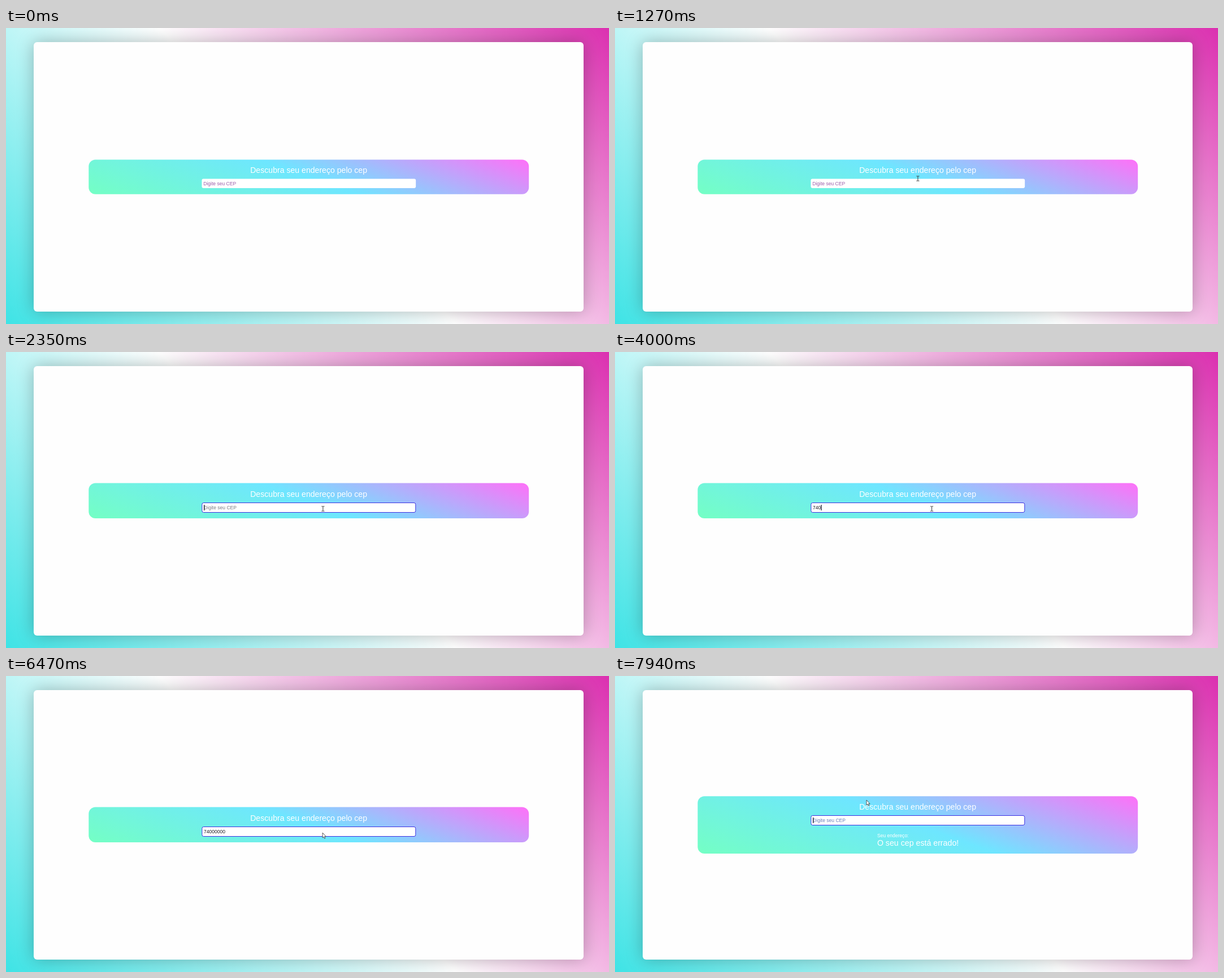
Write an HTML page that moves like this. It is 1067 px wide and 525 px high and loops after 8000 ms.

```html
<!DOCTYPE html>
<html lang="pt-BR">
<head>
<meta charset="utf-8">
<title>Descubra seu endereço pelo cep</title>
<style>
  html, body { margin: 0; width: 100%; height: 100%; overflow: hidden; }
  body { position: relative; background: linear-gradient(45deg, #3ee3e5, #fff 50%, #db30b0); }
  .card, svg { position: absolute; }
  .card {
    left: 49px; top: 25px; width: 973px; height: 478px;
    border-radius: 6px; background: #fefefe; box-shadow: 0 0 30px rgba(0, 0, 0, .27);
  }
  svg { left: 0; top: 0; }
  text { font: 8.54px "Liberation Sans", Arial, sans-serif; fill: #fff; white-space: pre; }
  .title { font-size: 14.1px; }
  .error { font-size: 14.2px; }
</style>
</head>
<body>
<div class="card"></div>
<svg width="1067" height="525" viewBox="0 0 1067 525">
  <linearGradient id="shade" gradientUnits="userSpaceOnUse">
    <stop stop-color="#74ffc4"/>
    <stop offset=".5" stop-color="#6ee6ff"/>
    <stop offset="1" stop-color="#ff70f8"/>
  </linearGradient>
  <rect id="panel" rx="12" fill="url(#shade)"/>
  <g id="form">
    <text class="title" x="432.2" y="257">Descubra seu endereço pelo cep</text>
    <rect id="box" fill="#fff" rx="2.8"/>
    <text id="value" y="279"></text>
    <rect id="caret" y="271" width="1.2" height="10" fill="#0c0c20"/>
  </g>
  <g id="answer">
    <text x="464" y="286.3">Seu endereço:</text>
    <text class="error" x="463.9" y="301">O seu cep está errado!</text>
  </g>
  <g id="pointer">
    <path id="arrow" d="M0 0V9L2 7.2 3.4 10.3 4.8 9.7 3.5 6.6H6.1Z" fill="#fff" stroke="#333" stroke-width=".8"/>
    <path id="beam" d="M-2.5-4.2H-.6L0-3.7.6-4.2H2.5M0-3.7V3.7M-2.5 4.2H-.6L0 3.7.6 4.2H2.5" fill="none" stroke="#333"/>
  </g>
</svg>
<script>
const LOOP = 8000, START = 70, STEP = 66.6;
const FOCUS = 2080, LEAVE = 6470, SUBMIT = 6550;
const CODE = '74000000', DIGIT = 4.75, BLINK = 530;
const KEY_START = 3470, KEY_GAP = 265, HOLD_START = 4530, REPEAT = 37;
const LEFT = 146.3, WIDTH = 778.9, TILT = 20 * Math.PI / 180, RISE = 20;

// Pointer stops: time, x, y
const stops = [
  [70, 1050, 494], [560, 235, 88], [950, 545, 18], [1100, 606, 288], [1268, 536.5, 267],
  [1480, 390, 262], [1800, 561, 278], [7200, 560, 278], [7560, 349, 262], [7740, 385, 195], [7920, 445, 220]
];

const el = id => document.getElementById(id);
const show = (id, on) => { el(id).style.display = on ? '' : 'none'; };
const set = (id, attrs) => {
  for (const k in attrs) el(id).setAttribute(k, attrs[k]);
};
const inside = (x, y, l, t, r, b) => x >= l && x <= r && y >= t && y <= b;

// Single presses first, then the zero key repeats while held.
function digitsAt(t) {
  if (t < KEY_START || t >= SUBMIT) return 0;
  if (t < HOLD_START) return Math.min(3, 1 + Math.floor((t - KEY_START) / KEY_GAP));
  return Math.min(CODE.length, 4 + Math.floor((t - HOLD_START) / REPEAT));
}

// Each key press restarts the blink.
function caretOn(t) {
  if (t < FOCUS) return false;
  const lastKey = HOLD_START + REPEAT * 4;
  if (t >= KEY_START && t < lastKey) return true;
  const since = t < KEY_START ? FOCUS : lastKey;
  return Math.floor((t - since) / BLINK) % 2 === 0;
}

function pointerAt(t) {
  const q = START + Math.floor((t - START) / STEP) * STEP;
  const i = stops.findIndex(s => s[0] > q);
  if (i < 0) return stops[stops.length - 1].slice(1);
  const [t0, x0, y0] = stops[i - 1], [t1, x1, y1] = stops[i];
  const k = (q - t0) / (t1 - t0);
  return [x0 + (x1 - x0) * k, y0 + (y1 - y0) * k];
}

function drawPanel(focused, done) {
  const [top, bottom] = done ? [213.2, 315] : focused ? [232.6, 295.1] : [233.5, 294.8];
  const height = bottom - top, cx = LEFT + WIDTH / 2, cy = (top + bottom) / 2;
  const sin = Math.sin(TILT), cos = Math.cos(TILT);
  const half = (WIDTH * sin + height * cos) / 2;
  set('panel', { x: LEFT, y: top, width: WIDTH, height });
  set('shade', { x1: cx - half * sin, y1: cy + half * cos, x2: cx + half * sin, y2: cy - half * cos });
  set('form', { transform: `translate(0 ${done ? -RISE : 0})` });
  set('box', focused
    ? { x: 346.9, y: 267.5, width: 377.9, height: 17, stroke: '#3c30e0' }
    : { x: 346.5, y: 267.6, width: 378.7, height: 16.3, stroke: 'none' });
  show('answer', done);
}

function drawInput(t, focused, done) {
  const n = digitsAt(t);
  const hint = done ? '#6c80bd' : focused ? '#7c7c86' : '#9c60aa';
  el('value').textContent = n ? CODE.slice(0, n) : 'Digite seu CEP';
  el('value').style.fill = n ? '#1c1c24' : hint;
  set('value', { x: focused ? 350.1 : 349.3 });
  set('caret', { x: 350.2 + n * DIGIT });
  show('caret', caretOn(t));
}

function drawPointer(t) {
  show('pointer', t >= START);
  if (t < START) return;
  const [x, y] = pointerAt(t);
  const formY = t >= LEAVE ? y + RISE : y;
  const overText = inside(x, formY, 432, 244, 640, 260) || inside(x, formY, 346, 266.5, 725, 285);
  set('pointer', { transform: `translate(${x} ${y})` });
  show('beam', overText);
  show('arrow', !overText);
}

function draw(now) {
  const t = now % LOOP, focused = t >= FOCUS, done = t >= SUBMIT;
  drawPanel(focused, done);
  drawInput(t, focused, done);
  drawPointer(t);
}

const begin = performance.now();
function tick() {
  draw(performance.now() - begin);
  requestAnimationFrame(tick);
}
tick();
</script>
</body>
</html>
```
